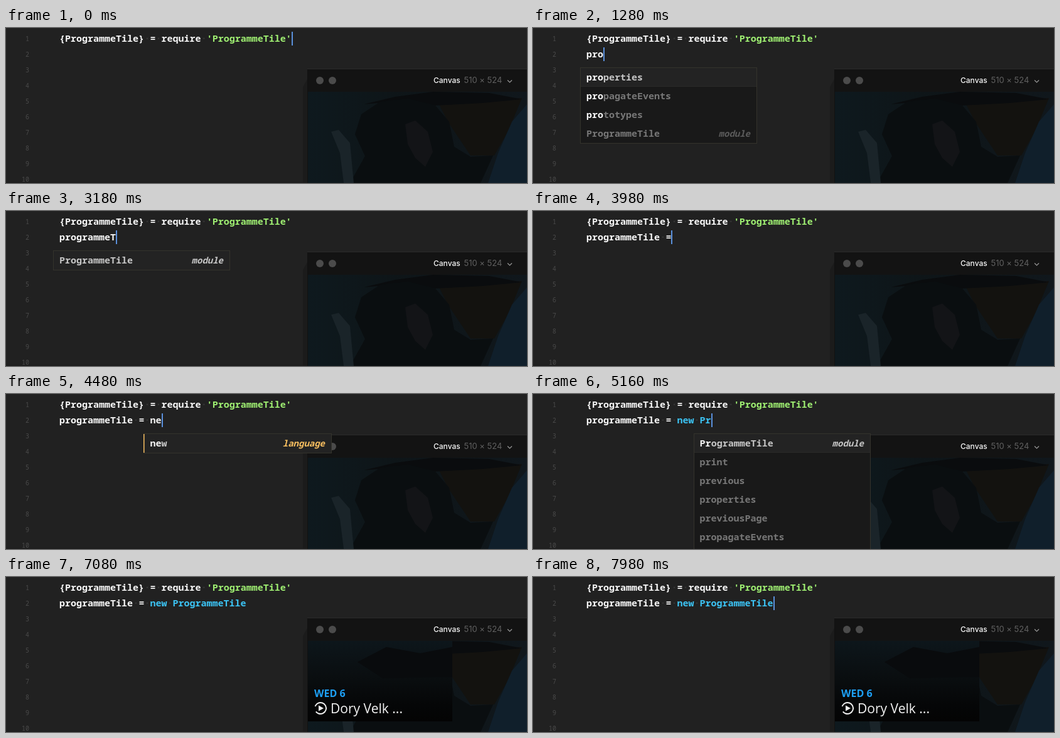
An HTML page with a canvas that plays this animation: 830x248 px, repeating every 8 s.

```html
<!DOCTYPE html>
<html lang="en">
<head>
<meta charset="utf-8">
<title>Code editor with autocomplete</title>
<style>
  html, body { margin: 0; width: 100%; height: 100%; overflow: hidden; background: #212121; }
  canvas { display: block; }
</style>
</head>
<body>
<canvas id="stage" width="830" height="248"></canvas>
<script>
const ctx = document.getElementById('stage').getContext('2d');
const LOOP = 8000, CHAR = 9.03, LEFT = 85, ROW = 25;
const MONO = '"Noto Sans Mono", "DejaVu Sans Mono", monospace';
const CODE = `600 15px ${MONO}`;
const KIND = `italic 600 14px ${MONO}`;
const WHITE = '#f8f8f8', GREEN = '#9fef72', CYAN = '#3cc4f5', ORANGE = '#f8bf60';

// Each entry adds its text to line 2 at the given time.
const keys = [
  [900, 'p'], [1040, 'r'], [1180, 'o'], [1420, 'g'], [1660, 'r'], [1760, 'a'],
  [1860, 'm'], [2520, 'm'], [2720, 'e'], [3040, 'T'], [3320, 'i'], [3440, 'l'],
  [3560, 'e'], [3720, ' '], [3920, '='], [4120, ' '], [4260, 'n'], [4400, 'e'],
  [4600, 'w'], [4740, ' '], [4880, 'P'], [5060, 'r'], [6160, 'ogrammeTile']
];
const ENTER = 560, ACCEPT = 6160, TILE = 6700;
const errors = [[2200, 2520], [5500, ACCEPT]];
const blinkStarts = [0, ENTER, ...keys.map(k => k[0]), 6440];

const suggestions = {
  p: ['parent', 'point', 'print', 'pinchable', 'properties', 'pixelAlign', 'ProgrammeTile'],
  pr: ['print', 'previous', 'properties', 'previousPage', 'propagateEvents', 'prototypes', 'ProgrammeTile'],
  pro: ['properties', 'propagateEvents', 'prototypes', 'ProgrammeTile'],
  P: ['ProgrammeTile', 'parent', 'point', 'print', 'pinchable', 'properties', 'pixelAlign'],
  Pr: ['ProgrammeTile', 'print', 'previous', 'properties', 'previousPage', 'propagateEvents', 'prototypes'],
  n: ['new', 'name', 'null'],
  ne: ['new'],
  new: ['new']
};

const columnX = column => Math.round(LEFT + column * CHAR);

function rect(x, y, w, h, color) {
  ctx.fillStyle = color;
  ctx.fillRect(x, y, w, h);
}

function circle(x, y, r, color) {
  ctx.fillStyle = color;
  ctx.beginPath();
  ctx.arc(x, y, r, 0, 7);
  ctx.fill();
}

function shape(color, ...points) {
  ctx.fillStyle = color;
  ctx.beginPath();
  points.forEach(([x, y]) => ctx.lineTo(x, y));
  ctx.fill();
}

function line(color, width, ...points) {
  ctx.strokeStyle = color;
  ctx.lineWidth = width;
  ctx.beginPath();
  points.forEach(([x, y]) => ctx.lineTo(x, y));
  ctx.stroke();
}

function text(str, x, y, color, font = CODE, align = 'left') {
  ctx.font = font;
  ctx.textAlign = align;
  ctx.fillStyle = color;
  ctx.fillText(str, x, y);
}

// Draws [text, color] tokens on the character grid, with faint dots for spaces.
function codeLine(tokens, y) {
  let x = LEFT;
  for (const [str, color] of tokens) {
    const blank = str === ' ';
    text(blank ? '·' : str, x, y, blank ? '#353535' : color);
    x += str.length * CHAR;
  }
}

function drawPhoto() {
  ctx.save();
  ctx.beginPath();
  ctx.rect(481, 102, 349, 146);
  ctx.clip();
  const base = ctx.createLinearGradient(481, 0, 830, 0);
  base.addColorStop(0, '#0e191e');
  base.addColorStop(0.4, '#0e1518');
  base.addColorStop(1, '#10171c');
  rect(481, 102, 349, 146, base);
  shape('#13120f', [690, 122], [822, 112], [800, 165], [778, 204], [740, 204], [704, 150]);
  shape('#0a0c0e', [570, 122], [620, 110], [680, 102], [770, 104], [822, 114], [760, 120], [684, 124], [640, 116]);
  shape('#101f2b', [830, 122], [806, 150], [784, 200], [768, 248], [830, 248]);
  shape('#0a0e10', [556, 170], [566, 138], [596, 118], [640, 113], [684, 124], [706, 150],
    [714, 190], [740, 206], [776, 204], [756, 248], [548, 248], [572, 205]);
  shape('#131417', [636, 154], [652, 148], [672, 166], [680, 198], [668, 222], [652, 208], [640, 186]);
  shape('#1a2429', [518, 166], [530, 163], [548, 184], [554, 248], [538, 248], [532, 200]);
  ctx.restore();
}

function drawTile() {
  const shade = ctx.createLinearGradient(0, 102, 0, 231);
  shade.addColorStop(0, '#0d161b');
  shade.addColorStop(0.45, '#0a0e10');
  shade.addColorStop(0.8, '#050607');
  shade.addColorStop(1, '#040404');
  rect(481, 102, 230, 129, shade);
  shape('#090b0d', [560, 136], [606, 112], [660, 122], [711, 112], [711, 160], [600, 162]);
  text('WED 6', 491, 192, '#1d9ff4', '700 16px "Open Sans", sans-serif');
  ctx.strokeStyle = '#f2f2f2';
  ctx.lineWidth = 2;
  ctx.beginPath();
  ctx.arc(501, 210, 9, -2.8, 2.5);
  ctx.stroke();
  shape('#f2f2f2', [498, 205.5], [506, 210], [498, 214.5]);
  text('Dory Velk ...', 517, 218, '#f2f2f2', '500 21px "Open Sans", sans-serif');
}

function drawWindow(t) {
  shape('#1b1b1b', [481, 80], [473, 94], [473, 248], [481, 248]);
  rect(480, 65, 350, 183, '#111111');
  rect(480, 65, 350, 1, '#2b2b2b');
  rect(481, 66, 349, 36, '#131313');
  drawPhoto();
  if (t >= TILE) drawTile();
  circle(500, 84, 6, '#4b4b4b');
  circle(520, 84, 6, '#4b4b4b');
  text('Canvas', 681, 88, WHITE, '500 12px Inter, sans-serif');
  text('510 × 524', 729.5, 88, '#606060', '400 13px Inter, sans-serif');
  line('#999999', 1.2, [799, 83.5], [802.5, 87], [806, 83.5]);
}

function drawPopup(word, start) {
  const known = suggestions[word];
  const module = /^prog/i.test(word);
  if (!known && !module) return;
  const items = known || ['ProgrammeTile'];
  const language = items[0] === 'new';
  const width = language ? 300 : word.length === 1 ? 327 : 282;
  const x = columnX(start) - 10, y = 63, height = items.length * 30 + 2;
  const textX = LEFT + start * CHAR;

  rect(x, y, width, height, '#191919');
  rect(x, y, width, 31, '#232323');
  ctx.strokeStyle = '#34332c';
  ctx.lineWidth = 1;
  ctx.strokeRect(x + 0.5, y + 0.5, width - 1, height - 1);
  if (items.length > 1) rect(x + 1, y + 30, width - 2, 1, '#2a2a28');
  if (language) rect(x, y + 1, 1.5, 30, ORANGE);

  items.forEach((item, i) => {
    const baseline = y + 21 + i * 30;
    const matched = item.startsWith(word) ? word.length : 0;
    const kind = item === 'ProgrammeTile' ? 'module' : item === 'new' ? 'language' : '';
    text(item.slice(0, matched), textX, baseline, WHITE);
    text(item.slice(matched), textX + matched * CHAR, baseline, i ? '#777777' : '#c6c6c6');
    text(kind, x + width - 11, baseline, language ? ORANGE : i ? '#5c5c5c' : '#c6c6c6', KIND, 'right');
  });
}

function cursorAlpha(t) {
  const start = blinkStarts.filter(s => s <= t).pop();
  const phase = (t - start) % 1400 / 1400;
  if (phase < 0.35) return 1;
  if (phase < 0.42) return (0.42 - phase) / 0.07;
  return Math.max(0, (phase - 0.85) / 0.15);
}

function draw(t) {
  const typed = keys.filter(k => k[0] <= t).map(k => k[1]).join('');
  const start = typed.lastIndexOf(' ') + 1;
  const word = typed.slice(start);
  const failing = errors.some(([from, to]) => t >= from && t < to);

  rect(0, 0, 830, 248, '#212121');
  rect(0, 246, 830, 2, '#1d1d1d');
  for (let n = 1; n <= 10; n++) {
    const marked = failing && n === 2;
    text(n, 37, n * ROW - 4, marked ? '#e0775a' : '#4a4a4a',
      `${marked ? 700 : 500} 10px ${MONO}`, 'right');
  }
  drawWindow(t);

  codeLine([['{ProgrammeTile}', WHITE], [' '], ['=', WHITE], [' '], ['require', WHITE], [' '],
    ["'ProgrammeTile'", GREEN]], 22);

  if (failing) {
    const x = columnX(start), width = word.length * 9;
    rect(x, 33, width, 19, '#4a2c2b');
    for (let dx = 0; dx < width; dx += 3) rect(x + dx, 52, 1.5, 1.5, '#b5524a');
  }
  const tokens = typed.split(/( )/).filter(Boolean)
    .map(s => [s, s === 'new' || s.startsWith('P') ? CYAN : WHITE]);
  codeLine(tokens, 47);
  if (t < ACCEPT) drawPopup(word, start);

  const onFirst = t < ENTER;
  ctx.globalAlpha = cursorAlpha(t);
  rect(columnX(onFirst ? 41 : typed.length), onFirst ? 6 : 31, 2, 22, '#5a90dc');
  ctx.globalAlpha = 1;
}

function tick() {
  draw(performance.now() % LOOP);
  requestAnimationFrame(tick);
}
tick();
</script>
</body>
</html>
```
